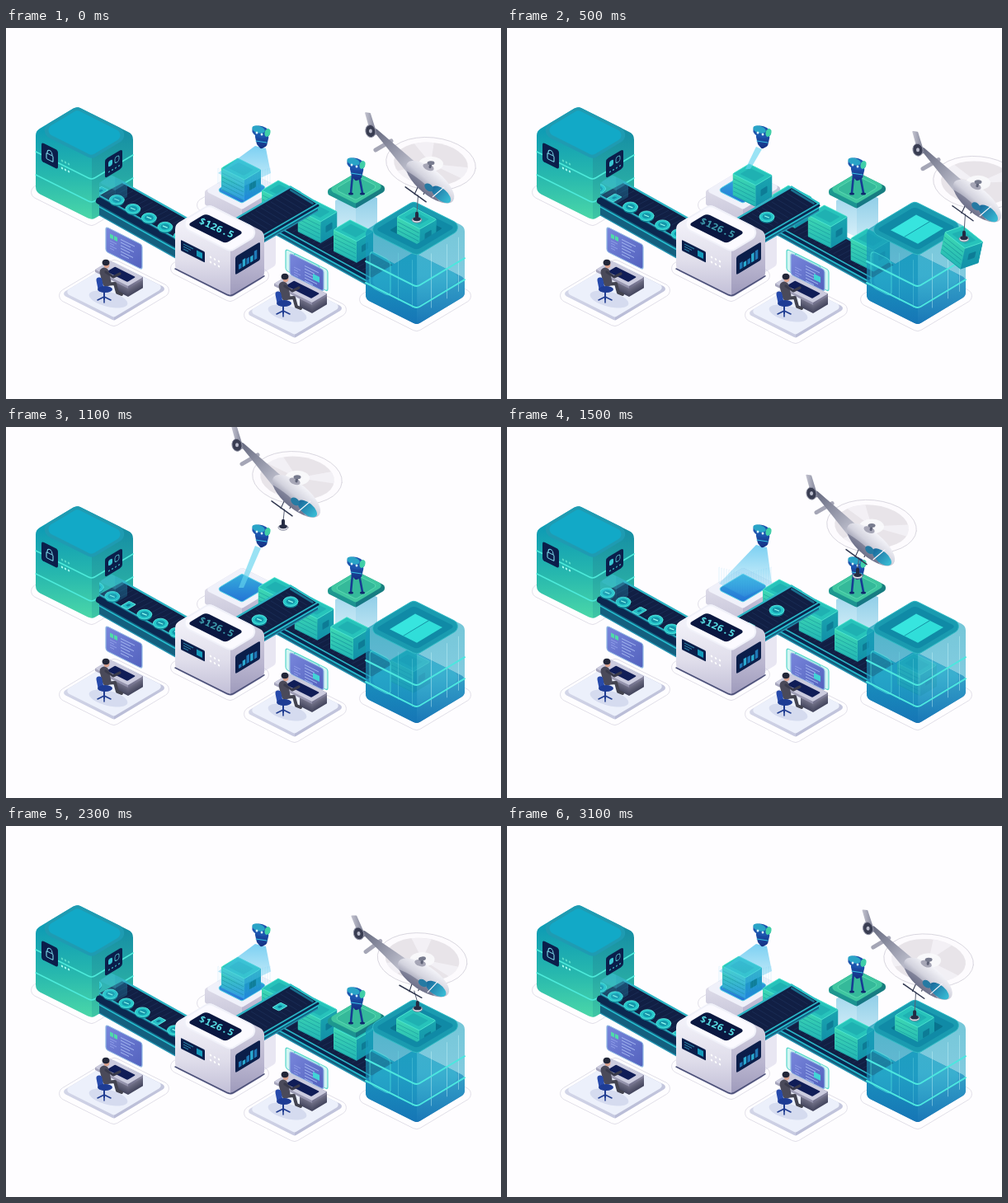
Write an HTML page with a canvas that moves like this. It is 600 by 450 pixels and loops after 3.2 s.

```html
<!DOCTYPE html>
<html lang="en">
<head>
<meta charset="utf-8">
<title>Isometric production line</title>
<style>
html, body { margin: 0; width: 100%; height: 100%; overflow: hidden; background: #fefdff; }
canvas { display: block; width: 600px; height: 450px; }
</style>
</head>
<body>
<canvas id="stage"></canvas>
<script>
const LOOP = 3200, STEP = 100;
const SL = .5, SR = .6; // slopes of the two ground axes
const canvas = document.getElementById('stage');
const dpr = window.devicePixelRatio || 1;
canvas.width = 600 * dpr;
canvas.height = 450 * dpr;
const c = canvas.getContext('2d');

// ---- time ----
const clamp = v => Math.max(0, Math.min(1, v));
const ramp = (t, a, b) => clamp((t - a) / (b - a));
const smooth = (t, a, b) => {
  const u = ramp(t, a, b);
  return u < .5 ? 2 * u * u : 1 - 2 * (1 - u) ** 2;
};
const bump = (t, mid, half) => Math.cos(clamp(Math.abs(t - mid) / half) * Math.PI / 2) ** 2;
const mix = (a, b, u) => a + (b - a) * u;

// ---- drawing ----
function at(x, y, draw, m = [1, 0, 0, 1]) {
  c.save();
  c.transform(...m, x, y);
  draw();
  c.restore();
}
const turned = a => [Math.cos(a), Math.sin(a), -Math.sin(a), Math.cos(a)];
function paint(fill, stroke, lw = 1) {
  if (fill) { c.fillStyle = fill; c.fill(); }
  if (stroke) { c.strokeStyle = stroke; c.lineWidth = lw; c.stroke(); }
}
function poly(pts, fill, r = 0, stroke, lw) {
  const n = pts.length, mid = [0, 1].map(i => (pts[n - 1][i] + pts[0][i]) / 2);
  c.beginPath();
  c.moveTo(...mid);
  pts.forEach((p, i) => c.arcTo(...p, ...pts[(i + 1) % n], r));
  c.closePath();
  paint(fill, stroke, lw);
}
function line(pts, color, lw = 1) {
  c.beginPath();
  pts.forEach(p => c.lineTo(...p));
  c.lineCap = c.lineJoin = 'round';
  paint(null, color, lw);
}
function oval(x, y, rx, ry, fill, stroke, lw, rot = 0) {
  c.beginPath();
  c.ellipse(x, y, rx, ry, rot, 0, 7);
  paint(fill, stroke, lw);
}
function box(x, y, w, h, fill, r = 0, stroke, lw) {
  c.beginPath();
  c.roundRect(x, y, w, h, r);
  paint(fill, stroke, lw);
}
function grad(colors, x0, y0, x1, y1) {
  const g = c.createLinearGradient(x0, y0, x1, y1);
  colors.forEach((k, i) => g.addColorStop(i / (colors.length - 1), k));
  return g;
}
const shade = (colors, y0, y1) => grad(colors, 0, y0, 0, y1);
function clipped(pts, draw) {
  c.save();
  poly(pts);
  c.clip();
  draw();
  c.restore();
}

// ---- ground geometry: front corner, left length, right length ----
const quad = (x, y, a, b) => ({
  x, y, a, b,
  L: [x - a, y - a * SL], T: [x - a + b, y - a * SL - b * SR], R: [x + b, y - b * SR], F: [x, y]
});
const ring = q => [q.L, q.T, q.R, q.F];
const lower = (q, d) => quad(q.x, q.y + d, q.a, q.b);
const grow = (q, m) => quad(q.x, q.y + m * (SL + SR), q.a + 2 * m, q.b + 2 * m);
const onLeft = (q, draw) => at(...q.L, draw, [1, SL, 0, 1]);
const onRight = (q, draw) => at(...q.F, draw, [1, -SR, 0, 1]);
const onTop = (q, draw) => at(...q.L, draw, [1, SL, 1, -SR]);

function block(q, h, r, top, left, right) {
  const d = lower(q, h);
  c.save();
  poly([q.L, q.T, q.R, d.R, d.F, d.L], null, r);
  c.clip();
  box(q.L[0], q.T[1], q.a + .4, h + 200, shade(left, q.L[1], d.y));
  box(q.x, q.T[1], q.b, h + 200, shade(right, q.R[1], d.y));
  c.restore();
  if (top) poly(ring(q), top, r);
}
function band(q, dy, color, lw) {
  const d = lower(q, dy);
  c.beginPath();
  c.moveTo(...d.L);
  c.arcTo(...d.F, ...d.R, 8);
  c.lineTo(...d.R);
  paint(null, color, lw);
}
const outline = (q, m) => poly(ring(grow(q, m)), null, 8, '#dedce6', .9);

// Conveyor: outer edge starts at x, y; the belt lies across it by w, d
function belt(x, y, len, slope, w, d, side) {
  const p = (u, v, z = 0) => [x + len * u + w * v, y + len * slope * u + d * v + z];
  poly([p(0, 0), p(1, 0), p(1, 0, side), p(0, 0, side)], '#14607f');
  line([p(0, 0, side * .28), p(1, 0, side * .28)], '#0b2850', side * .34);
  line([p(0, 0, side * .58), p(1, 0, side * .58)], '#27bfd0', 1.6);
  line([p(0, 0, side), p(1, 0, side)], '#2494b2', 1.4);
  poly([p(0, 0), p(1, 0), p(1, 1), p(0, 1)], '#111f44');
  for (let u = .03; u < 1; u += 6 / len) line([p(u, .12), p(u, .88)], '#1c2f58', .8);
  line([p(0, 1), p(1, 1)], '#2bb4c4', 2.4);
  line([p(0, 0), p(1, 0)], '#2bb4c4', 1.6);
  return p;
}

// ---- goods ----
function crate(x, y, h = 26, blue = false) {
  const q = quad(x + 4, y + 12, 28, 20);
  block(q, h, 1, '#27c3bb', ['#3ed8b2', blue ? '#3199e4' : '#22b5b5'], ['#1aa5b0', blue ? '#2388de' : '#1290a8']);
  onLeft(q, () => {
    for (let d = 5; d < h; d += 5) box(1, d, 26, .8, 'rgba(15,135,150,.6)');
  });
  onRight(q, () => { if (h > 18) box(6, 9, 8, 8, '#0d7c96', 1); });
  onTop(q, () => box(5, 4, 18, 12, 'rgba(20,150,165,.4)', 1));
  poly(ring(q), null, 1, '#55ecd3', .8);
}
function coin(x, y) {
  oval(x, y + 2, 9, 5.8, '#0e8497');
  oval(x, y, 9, 5.8, '#27c8cb', '#5ff0e4', .8);
  oval(x, y, 5.5, 3.5, '#1596aa');
  line([[x - 2.5, y - 1], [x + 2.5, y + 1]], '#8ffbef', 1.2);
}
function bill(x, y) {
  at(x, y, () => {
    box(-4, -5, 8, 10, '#26bfc6', 1, '#66eee4', .8);
    box(-1.5, -2, 3, 4, '#0f7f9a', 1);
  }, [1, SL, 1, -SR]);
}

// ---- stations ----
function vault() {
  const q = quad(104, 159, 68, 50), face = ['#109db4', '#27b8ae', '#4cd8a8'];
  outline(lower(q, 74), 7);
  block(q, 74, 10, '#1f9bb2', face, ['#1790a4', '#26a8a5', '#40c8a4']);
  poly(ring(grow(q, -4)), '#12a9c7', 7);
  for (const d of [25, 53]) band(q, d, '#4deada', 1.5);
  onLeft(q, () => {
    box(7, 10, 20, 23, '#0b1e4b', 3);
    oval(17, 19, 3, 4, null, '#7fdcec', 1);
    box(13, 20, 8, 7, '#0b1e4b', 1, '#7fdcec', 1.1);
    for (let i = 0; i < 6; i++) oval(32 + i % 3 * 4, i < 3 ? 20 : 29, 1.2, 1.3, i < 3 ? '#5adccb' : '#a5fff0');
  });
  onRight(q, () => {
    box(16, 10, 21, 23, '#0b1e4b', 3);
    box(20, 15, 5, 7, '#39c6d4', 2);
    box(28, 15, 5, 7, null, 2, '#59cbd6', .8);
    for (let i = 0; i < 4; i++) oval(21 + i * 4, 28, .9, .9, '#3fc9d0');
  });
}

function feed(t) {
  belt(113, 203, 101, .56, 29, -15.5, 24);
  clipped([[113, 180], [230, 180], [230, 290], [113, 290]], () => {
    for (let k = -5; k <= 5; k++) {
      const x = 114.8 + 30.5 * t + 19.52 * k;
      (k ? coin : bill)(x, 207 + (x - 132) * .56);
    }
  });
  block(quad(132, 197, 19, 15), 17, 2, 'rgba(70,200,215,.3)', ['rgba(60,190,210,.35)', 'rgba(60,190,210,.2)'], ['rgba(40,160,195,.4)', 'rgba(40,160,195,.2)']);
}

function bot(x, y, legs) {
  at(x, y, () => {
    if (legs) for (const side of [-1, 1]) {
      line([[side * 4, 14], [1 + side * 7, 35]], '#173c93', 2.6);
      oval(1 + side * 7, 36, 3, 1.6, '#10296d');
    }
    poly([[-8, 2], [10, 4], [7, 17], [0, 21], [-5, 15]], shade(['#1d5cb8', '#152f81'], 0, 20), 3);
    line([[-6, 11], [7, 13]], '#37bde0', 1.2);
    oval(0, 0, 11, 7, '#1e55ae', null, 1, .3);
    oval(-3, -3, 8, 4.3, '#2aa4c7', null, 1, .3);
    oval(8, 1, 3.4, 5, '#40cfa8', null, 1, .3);
    for (const i of [-1, 1]) oval(i * 3 - 2, 2 + i, 1.4, 1.5, '#d8fbff');
  });
}

function printer() {
  const q = quad(286, 220, 45, 45);
  outline(lower(q, 17), 9);
  block(q, 17, 3, '#f0f1fa', ['#dcdae8', '#c6c4d8'], ['#c9c6da', '#b3aecc']);
  const bed = grow(q, -7);
  poly(ring(bed), shade(['#35aedb', '#2473d6'], bed.T[1], bed.y), 3, '#58d3e7');
}
const printGrowth = t => smooth(t, 1.7, 2.4);
function beam(t) {
  if (t > .25 && t < 1.3) {
    const u = ramp(t, .5, 1.1), x = mix(292, 285, u), y = mix(171, 195, u);
    poly([[302, 144], [309, 147], [x + 3, y], [x - 3, y]], 'rgba(100,213,239,.65)');
    return;
  }
  const y = t < 1 ? 176 : mix(190, 176, printGrowth(t));
  c.globalAlpha = t < 1 ? 1 - t * 2.5 : 1;
  poly([[302, 143], [315, 146], [321, y], [288, y + 16], [257, y]], shade(['rgba(73,190,237,.72)', 'rgba(83,201,239,.12)'], 143, 208));
  for (let x = 257; x < 321; x += 3) {
    const d = Math.abs(x - 288) / 2;
    line([[x, 178 - d / 2], [x, 204 - d]], 'rgba(77,184,236,.23)', .7);
  }
  c.globalAlpha = 1;
}

// Each crate moves on to the next stop during the first part of the loop
const stop = i => i ? 334 + 43.5 * (i - 1) : 285;
const TANK = 497;
const crateX = (i, t) => mix(stop(i), i === 3 ? TANK : stop(i + 1), smooth(t, 0, 1.4));
const pathY = x => 172 + (x - 285) * .55;
function crates(t) {
  const g = printGrowth(t);
  if (g > .02) crate(285, 198 - 26 * g, 26 * g, true);
  for (let i = 0; i < 3; i++) crate(crateX(i, t), pathY(crateX(i, t)), 26, !i && t < .3);
}

const pressDrop = t => 38 * (smooth(t, 1.75, 2.3) - smooth(t, 2.45, 2.95));
function pressColumn(t) {
  const d = pressDrop(t);
  block(quad(424, 222 + d, 25, 26), 32 - d * .8, 1, null, ['#a9daee', '#d6eff9'], ['#92cfe8', '#c5e8f5']);
}
function press(t) {
  const d = pressDrop(t), q = quad(424, 213 + d, 34, 35);
  block(q, 6, 4, '#3fc6a0', ['#1e998e', '#1b9192'], ['#18807f', '#167586']);
  poly(ring(grow(q, -4)), '#35b99a', 3, '#62ddb6', .8);
  bot(424, 165 + d, true);
}

function outfeed(t) {
  const p = belt(300, 258, 78, -.58, -33, -20, 9);
  const goods = [[coin, 290], [coin, 252], [bill, 217]];
  for (const [draw, x0] of goods) {
    const x = x0 + 50 * t;
    if (x > 284 && x < 361) draw(x, 229 - (x - 315) * .58);
  }
  line([p(1, 0), p(1, 1)], '#2ac0c6', 2.5);
  line([p(.96, .1), p(.96, .9)], '#1a6f8e', 2.5);
}

function machine(t) {
  const q = quad(272, 272, 67, 41), base = lower(q, 53);
  outline(base, 7);
  onRight(base, () => box(30, -48, 25, 44, 'rgba(205,202,226,.45)', 3));
  outfeed(t);
  block(q, 55, 10, '#f0f1f9', ['#f1f0f8', '#e0deeb', '#c0bdd6'], ['#cfccdd', '#b9b5cf', '#9c98ba']);
  band(q, 53.5, '#4b5078', 1.5);
  poly(ring(grow(q, -2)), '#fbfaff', 8);
  onTop(q, () => box(8, 7, 46, 22, '#0a1740', 4));
  at(255, 243, () => {
    c.globalAlpha = .78 + .22 * Math.cos(2 * Math.PI * t / .8);
    c.font = 'bold 12px "Noto Sans Mono", monospace';
    c.textAlign = 'center';
    c.textBaseline = 'middle';
    c.fillStyle = '#5cebee';
    c.fillText('$126.5', 0, 0);
  }, [.95, .42, -.42, .85]);
  onLeft(q, () => {
    box(7, 15, 29, 13, '#0b1e4a', 1);
    box(26, 18, 7, 7, '#159abb');
    for (let i = 0; i < 3; i++) box(10, 18 + i * 3, 12 - i * 3, 1, '#2b8eb2');
    for (let i = 0; i < 6; i++) oval(43 + i % 3 * 5, 18 + (i > 2) * 6, 1.2, 1.2, '#fff');
  });
  onRight(q, () => {
    box(6, 9, 30, 22, '#0b1e4a', 2);
    for (let i = 0; i < 5; i++) {
      const h = 6 + i + 2 * Math.sin(2 * Math.PI * t / 1.6 + i * 1.7);
      box(10 + i * 4.7, 27 - h, 3.5, h, i % 2 ? '#2aaad0' : '#1f78b6');
    }
  });
}

// ---- desks ----
function screen(x, y, w, h, holo) {
  const pane = (d, fill, edge) => at(x + d, y + Math.min(d, 0), () => box(0, 0, w, h, fill, 3, edge, 1.2), [1, SL, 0, 1]);
  if (holo) for (const d of [5, -5]) pane(d, 'rgba(80,217,205,.25)', '#58d7cc');
  pane(0, grad(['#7987dc', '#5261bd'], 0, 0, w, h), '#8fb8e4');
  at(x, y, () => {
    for (let i = 0; i < 6; i++) box(18, 6 + i * 3.6, 17 - i * 5 % 9, 1, '#a3b6f0');
    for (let i = 0; i < 4; i++) box(5, 14 + i * 3, 8 - i % 2 * 3, 1, '#8f9de7');
    if (holo) box(28, 11, 8, 7, '#42d3d7');
    else for (let i = 0; i < 2; i++) box(5 + i * 5, 6, 4, 5, '#4edca9');
  }, [1, SL, 0, 1]);
}
function worker(dx, dy, extra) {
  at(dx, dy, () => {
    const desk = quad(148 + extra, 313 + extra / 2, 40 + extra, 18);
    const dark = shade(['#7c7b91', '#30334c'], 0, 17);
    oval(124, 329, 24, 9, 'rgba(170,178,216,.35)', null, 1, .25);
    onLeft(desk, () => box(desk.a - 15, 2, 15, 11, dark));
    onRight(desk, () => box(0, 2, 18, 11, dark));
    block(desk, 3, 1, '#cbcbde', ['#a9a8bf', '#8f8ea8'], ['#85849d', '#6f6e8a']);
    onTop(desk, () => box(10, 4, 25 + extra, 10, '#101d57', 1));
    line([[119, 320], [119, 329]], '#203d91', 2);
    for (let i = 0; i < 3; i++) line([[119, 326], [111 + i * 8, 330 + i % 2 * 3]], '#203d91', 1.6);
    line([[120, 311], [132, 310], [135, 321], [140, 323]], '#42434f', 4);
    line([[119, 296], [122, 308]], '#4a4a5a', 11);
    line([[121, 296], [130, 302], [138, 298]], '#3a3b4c', 3.2);
    line([[113, 306], [115, 316]], '#274aab', 7);
    oval(120, 317, 9, 4, '#1e3c94');
    oval(122, 287, 3.4, 4.4, '#dba28d');
    oval(121, 284.5, 4.4, 3.8, '#222638');
  });
}
function desks() {
  const pads = [quad(131, 351, 61, 61), quad(350, 372, 56, 57)];
  for (const q of pads) {
    outline(lower(q, 4), 7);
    block(q, 4, 4, '#ecf0fb', ['#d3d6e8', '#c6c9e0'], ['#c3c6dd', '#b8bbd6']);
  }
  screen(121, 241, 44, 30);
  worker(0, 0, 0);
  screen(344, 273, 41, 26, true);
  worker(217, 17, 6);
}

// ---- storage tank ----
const tank = quad(498, 276, 62, 58);
const hatchClip = [[465, 245], [465, 60], [529, 60], [529, 243], [498, 262]];
const hatchOpen = t => t < 1 ? 1 - smooth(t, .05, .4) : smooth(t, 1.7, 2.2);
const liftY = t => mix(288, 236, smooth(t, 1.7, 2.3));

function storage(t) {
  outline(lower(tank, 84), 8);
  block(lower(tank, 62), 22, 8, '#2aa9cd', ['#1783bc', '#1667ad'], ['#1c7dba', '#1767ad']);
  const x = crateX(3, t);
  if (t < 1.7) crate(x, pathY(x));
  else if (t < 2.7) crate(TANK, liftY(t));
  block(tank, 84, 9, null, ['rgba(22,156,184,.74)', 'rgba(26,150,190,.66)', 'rgba(22,121,184,.8)'],
    ['rgba(70,180,203,.74)', 'rgba(66,178,208,.66)', 'rgba(24,122,185,.82)']);
  onLeft(tank, () => {
    box(5, 22, 25, 44, 'rgba(69,211,217,.14)', 6, 'rgba(83,232,222,.6)', 1);
    for (const u of [39, 56]) box(u, 8, .8, 58, 'rgba(119,224,229,.4)');
  });
  onRight(tank, () => {
    for (const u of [17, 36, 50]) box(u, 8, .8, 66, 'rgba(201,246,247,.55)');
  });
  for (const d of [38, 64]) band(tank, d, '#4ce7df', 2);
  poly(ring(tank), '#1a9bb0', 8, '#32bcc6', 1);
  onTop(tank, () => {
    box(6, 6, 50, 46, '#108aa6', 4);
    box(16, 13, 33, 31, '#08738e', 2);
    const leaf = 16.5 * (1 - hatchOpen(t));
    box(16, 13, leaf, 31, '#37e5df');
    box(49 - leaf, 13, leaf, 31, '#30ded9');
    if (leaf > 12) box(32, 13, .8, 31, '#168fa2');
  });
}

// ---- helicopter ----
function helicopter({ x, y, tilt, mx, my }, t) {
  at(x, y, () => {
    oval(0, 0, 54.5, 32, 'rgba(250,249,252,.45)', '#d0cdd7', .8, .1);
    oval(0, 0, 45, 26, 'rgba(228,225,230,.85)', null, 1, .1);
    for (let i = 0; i < 3; i++) {
      const a = t * 11 + i * 2.094;
      c.beginPath();
      c.moveTo(0, 0);
      c.ellipse(0, 0, 45, 26, .1, a, a + .55);
      paint('rgba(250,249,253,.6)');
    }
    oval(0, 0, 15, 9, 'rgba(250,249,252,.9)');
    line([[mx / 2 - 7, 38], [mx, my - 5]], '#596075', 1);
    at(0, 0, airframe, turned(tilt));
    oval(mx, my + 3, 6, 3.4, '#e4e3ec', '#777b90', .8);
    line([[mx, my - 5], [mx, my]], '#242a42', 4);
    oval(mx, my + 2, 4.8, 2.4, '#262c44');
  });
}
function airframe() {
  line([[-67, -17], [-48, -28]], '#a5a6b6', 5);
  poly([[-71, -42], [-66, -43], [-14, 2], [-26, 14]], grad(['#666a80', '#c5c6d3'], -70, -40, -20, 8), 2);
  poly([[-80, -63], [-73, -62], [-65, -36], [-72, -34]], grad(['#c0c0cd', '#7d8095'], -79, 0, -66, 0), 1);
  oval(-73, -40, 6, 7.5, '#393d52', '#8b8da0', 1, -.2);
  oval(-73, -40, 2, 2.5, '#b9bbcb');
  for (let i = 0; i < 2; i++) {
    line([[-31 + i * 18, 28], [-6 + i * 20, 46]], '#303750', 1.5);
    line([[-14 + i * 11, 24], [-20 + i * 11, 37]], '#30374f', 1.1);
  }
  // cabin in its own axis, nose to the right
  at(-1, 22, () => {
    oval(0, 0, 36, 15, shade(['#f4f4f9', '#d3d3de', '#85879e'], -15, 15));
    c.clip();
    oval(-8, 15, 34, 9, 'rgba(92,96,122,.55)');
    oval(20, 3, 14, 7, grad(['#1b6e9f', '#38b9d3'], 8, 0, 32, 0));
    oval(3, 6, 6, 4, '#257aa3');
    line([[17, -6], [14, 12]], '#f2f3fa', 1.2);
  }, turned(.7));
  oval(-3, 4, 7, 3.8, '#a6a6b6', null, 1, .4);
  line([[-1, 4], [0, -1]], '#5e6277', 3);
  oval(0, -1, 4.5, 2.5, '#777b8e');
}
const pitch = t => -.117 * bump(t, 2.4, .9);
function arrival(t) {
  const rest = (3.35 * (2.7 - t)) ** 3;
  return {
    x: 507 - rest, y: 163.5 - .66 * rest, tilt: pitch(t),
    mx: -17 + 15 * bump(t, 2.1, .6) + 7 * ramp(t, 2.3, 2.7), my: 57 + 12 * smooth(t, 2.35, 2.7)
  };
}
function departure(t) {
  const dx = 64 * (t - 2.7) ** 3, u = ramp(t, 2.7, 3.1);
  return {
    x: 507 + dx, y: 163.5 - 2 * u + .41 * dx, tilt: pitch(t),
    mx: mix(-10, -17, u), my: mix(69, 65, ramp(t, 3, 3.2)), swing: .21 * ramp(t, 3.15, 3.7)
  };
}
function flights(t) {
  const late = t < 1 ? t + LOOP / 1000 : t; // the departure spans the loop seam
  if (t >= 1.7 && t < 2.7) clipped(hatchClip, () => crate(TANK, liftY(t)));
  if (late >= 2.7) {
    const f = departure(late);
    const load = () => at(f.x + f.mx, f.y + f.my, () => crate(0, 2), turned(f.swing));
    if (late < 3.25) clipped(hatchClip, load);
    else load();
    helicopter(f, t);
  }
  if (t >= .5 && t < 2.7) helicopter(arrival(t), t);
}

function render(t) {
  c.setTransform(dpr, 0, 0, dpr, 0, 0);
  box(0, 0, 600, 450, '#fefdff');
  vault();
  feed(t);
  printer();
  pressColumn(t);
  belt(304, 227, 142, .55, 29, -15.5, 11);
  crates(t);
  beam(t);
  bot(309, 126);
  press(t);
  machine(t);
  desks();
  storage(t);
  flights(t);
}

const start = performance.now();
function tick() {
  const ms = (performance.now() - start) % LOOP;
  render(Math.floor(ms / STEP) * STEP / 1000);
  requestAnimationFrame(tick);
}
tick();
</script>
</body>
</html>
```
